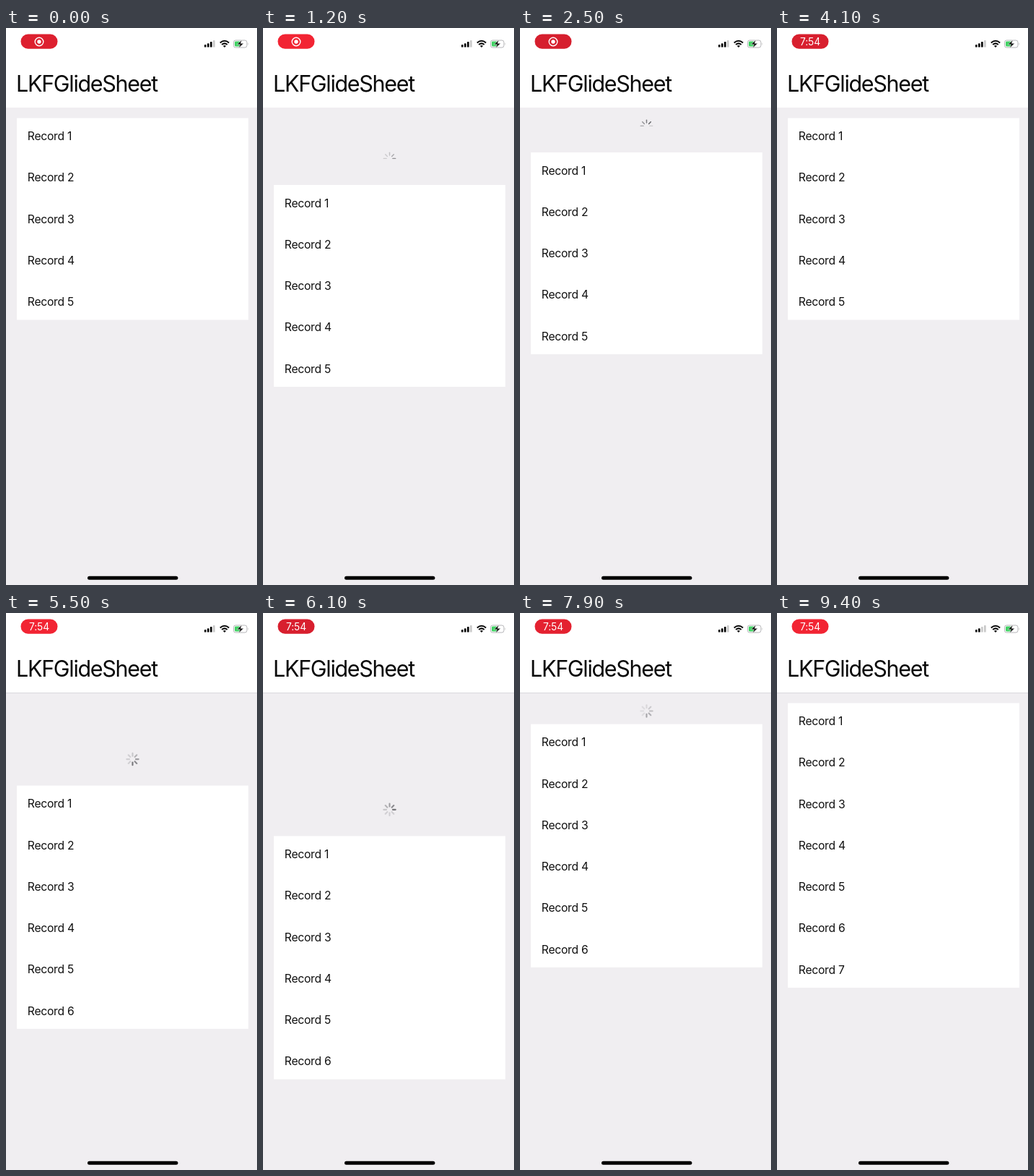
These frames come from a looping animation (348x770 px, 9500 ms). An HTML page:

```html
<!DOCTYPE html>
<html lang="en">
<head>
<meta charset="utf-8">
<title>Pull to refresh</title>
<style>
  html, body { margin: 0; width: 100%; height: 100%; overflow: hidden; background: #f0eef1; }
  svg { display: block; width: 348px; height: 770px; }
  text { font-family: Inter, "Open Sans", sans-serif; font-optical-sizing: none; fill: #111; }
  .title { font-size: 30.5px; letter-spacing: -1.3px; fill: #080808; }
  .row { font-size: 15.7px; letter-spacing: -0.28px; }
  .clock { font-size: 13.8px; letter-spacing: -0.1px; fill: #fff; text-anchor: middle; }
</style>
</head>
<body>
<svg viewBox="0 0 348 770">
  <defs>
    <clipPath id="upper"><rect x="-12" y="-12" width="24" height="12.6"/></clipPath>
  </defs>
  <rect width="348" height="770" fill="#f0eef1"/>

  <g id="spinner"><g id="ticks" stroke-linecap="round"></g></g>

  <g id="list">
    <rect id="card" x="15" y="124.5" width="321" height="279" fill="#fff"/>
  </g>

  <rect width="348" height="110" fill="#fff"/>
  <rect id="rule" y="110" width="348" height="1" fill="#d9d8dc"/>
  <text class="title" x="14" y="88">LKFGlideSheet</text>

  <rect id="pill" x="20.5" y="8.5" width="51" height="20.2" rx="10"/>
  <g id="record" fill="none" stroke="#fff" stroke-width="1.4">
    <circle cx="46" cy="19" r="5.8"/>
    <circle cx="46" cy="19" r="2.7" fill="#fff" stroke="none"/>
  </g>
  <text id="clock" class="clock" x="46" y="23.6">7:54</text>

  <g id="bars" fill="#0a0a0a">
    <rect x="275" y="23" width="2.7" height="3.6" rx=".7"/>
    <rect x="279" y="21.2" width="2.7" height="5.4" rx=".7"/>
    <rect x="283" y="19" width="2.7" height="7.6" rx=".7"/>
    <rect x="287" y="17" width="2.7" height="9.6" rx=".7"/>
  </g>
  <g fill="none" stroke="#0a0a0a" stroke-width="2">
    <path d="M296.8 20.4Q303 15.2 309.2 20.4"/>
    <path d="M299.2 23Q303 19.8 306.8 23"/>
    <path d="M303 27L300.9 24.7Q303 23.2 305.1 24.7Z" fill="#0a0a0a" stroke="none"/>
  </g>
  <rect x="315.5" y="17" width="18.5" height="10" rx="2.8" fill="#fff" stroke="#b5b5b8"/>
  <path d="M335.6 20.4q1.6 1.6 0 3.2z" fill="#aaa"/>
  <rect x="317" y="18.5" width="7.5" height="7" rx="1.4" fill="#43d265"/>
  <path d="M327 16.4L320.4 22.8H324.4L322.6 27.8L329.4 21.2H325.4Z" fill="#0a0a0a" stroke="#fff" stroke-width=".5"/>

  <rect x="113" y="757.8" width="125.4" height="5" rx="2.5" fill="#000"/>
</svg>
<script>
  const LOOP = 9500, REST = 124.5, ROW = 57.25, HOLD = 47.5;
  const SVG_NS = 'http://www.w3.org/2000/svg';
  const $ = id => document.getElementById(id);

  const ease = {
    in: p => p * p,
    out: p => 1 - (1 - p) ** 3,
    both: p => p * p * (3 - 2 * p),
    line: p => p
  };

  const closeOne = 3485, closeTwo = 7740, closeTime = 380;
  const addSix = 4650, addSeven = 8800, clockOn = 3200, weakSignal = 8600;

  // time, list offset, easing from the previous step
  const steps = [
    [0, 0], [700, 0], [900, 22, 'in'], [1600, 186, 'line'], [1780, 204, 'out'],
    [1880, 204], [2380, HOLD, 'both'], [closeOne, HOLD], [closeOne + closeTime, 0, 'both'],
    [4950, 0], [5150, 25, 'in'], [5800, 190, 'line'], [5920, 200, 'out'],
    [6000, 200], [6500, HOLD, 'both'], [closeTwo, HOLD], [closeTwo + closeTime, 0, 'both'],
    [LOOP, 0]
  ];

  function add(parent, tag, attrs) {
    const el = document.createElementNS(SVG_NS, tag);
    for (const name in attrs) el.setAttribute(name, attrs[name]);
    return parent.appendChild(el);
  }
  const show = (el, on) => el.setAttribute('visibility', on ? 'visible' : 'hidden');

  const rows = Array.from({ length: 7 }, (_, i) => {
    const el = add($('list'), 'text', { class: 'row', x: 29.8, y: 155.2 + i * ROW });
    el.textContent = `Record ${i + 1}`;
    return el;
  });
  const ticks = Array.from({ length: 8 }, (_, i) =>
    add($('ticks'), 'line', { y1: -4.4, y2: -8.2, transform: `rotate(${i * 45})` }));
  const bars = [...$('bars').children];

  function offsetAt(t) {
    const i = steps.findIndex((s, k) => k && t <= s[0]);
    const [t0, a] = steps[i - 1], [t1, b, curve = 'line'] = steps[i];
    return a + (b - a) * ease[curve]((t - t0) / (t1 - t0));
  }

  function drawSpinner(t, offset) {
    const first = t < addSix;
    const closing = t > (first ? closeOne : closeTwo);
    const y = REST - 36.5 + (closing ? HOLD : offset);
    $('spinner').setAttribute('transform', `translate(175.5 ${y})`);
    $('spinner').setAttribute('opacity', Math.min(1, offset / HOLD));
    $('ticks').setAttribute('stroke', first ? '#626266' : '#77777b');
    $('ticks').setAttribute('stroke-width', first ? 1.4 : 2.1);
    if (first) $('ticks').setAttribute('clip-path', 'url(#upper)');
    else $('ticks').removeAttribute('clip-path');
    const head = Math.floor((t - (first ? 1600 : 5900)) / 100 + 80);
    ticks.forEach((tick, i) => {
      const age = (head - i + 80) % 8;
      tick.setAttribute('opacity', Math.max(0.25, 1 - age * 0.17));
    });
  }

  function render(t) {
    const offset = offsetAt(t);
    const count = 5 + (t >= addSix) + (t >= addSeven);
    $('list').setAttribute('transform', `translate(0 ${offset})`);
    $('card').setAttribute('height', 50 + ROW * (count - 1));
    rows.forEach((row, i) => show(row, i < count));
    drawSpinner(t, offset);

    const wave = 0.5 - 0.75 * Math.cos((t - 400) / 1000 * Math.PI);
    const glow = Math.min(1, Math.max(0, wave));
    $('pill').setAttribute('fill', `rgb(${214 + 28 * glow},${31 + 5 * glow},${46 + 5 * glow})`);
    show($('record'), t < clockOn);
    show($('clock'), t >= clockOn);
    show($('rule'), t >= addSix);

    const strength = t < weakSignal ? 3 : 2;
    bars.forEach((bar, i) => bar.setAttribute('opacity', i < strength ? 1 : 0.22));
  }

  const start = performance.now();
  function frame() {
    render((performance.now() - start) % LOOP);
    requestAnimationFrame(frame);
  }
  frame();
</script>
</body>
</html>
```
